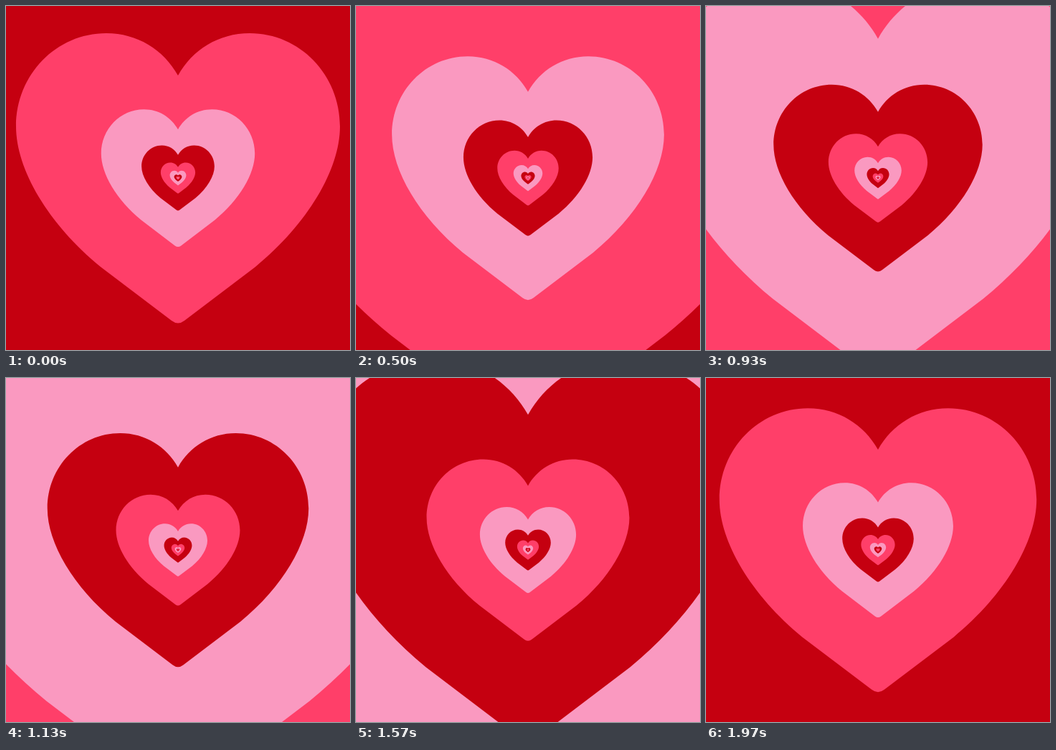
An HTML page with a canvas for the animation above (2010 ms loop, 480x480 px).

```html
<!DOCTYPE html>
<html lang="en">
<head>
<meta charset="utf-8">
<title>Endless hearts</title>
<style>
  html, body { margin: 0; width: 100%; height: 100%; overflow: hidden; background: #c50010; }
  canvas { display: block; width: 480px; height: 480px; }
</style>
</head>
<body>
<canvas id="stage" width="480" height="480"></canvas>
<script>
const ctx = document.getElementById('stage').getContext('2d');
const RED = '#c50010', ROSE = '#ff3f69', PINK = '#fa99c0';
const COLORS = [ROSE, PINK, RED];
const RATIO = 2.108;  // size of each heart relative to the one inside it
const LOOP = 2010;
const HEARTS = 10;

// Heart centred on the zoom point
const heart = new Path2D(`M0-143
  C-20-179-57-202-100-202 C-170-202-226-144-226-72
  C-226-12-181 64-108 124 L-9 199 Q0 206 9 199 L108 124
  C181 64 226-12 226-72 C226-144 170-202 100-202
  C57-202 20-179 0-143Z`);

// Thirty pictures a second, on a clock of 10 ms ticks
function zoomAt(ms) {
  const step = Math.min(59, Math.floor((ms + 3.4) * 0.03));
  return step ? (Math.round(step * 10 / 3) * 10 + 11) / 2000 : 0;
}

function draw(ms) {
  const zoom = zoomAt(ms) * COLORS.length;
  ctx.setTransform(1, 0, 0, 1, 0, 0);
  ctx.fillStyle = RED;
  ctx.fillRect(0, 0, 480, 480);
  for (let i = 0; i < HEARTS; i++) {
    const scale = RATIO ** (zoom - i);
    ctx.setTransform(scale, 0, 0, scale, 240, 240);
    ctx.fillStyle = COLORS[i % COLORS.length];
    ctx.fill(heart);
  }
}

const start = performance.now();
function tick() {
  draw((performance.now() - start) % LOOP);
  requestAnimationFrame(tick);
}
tick();
</script>
</body>
</html>
```
